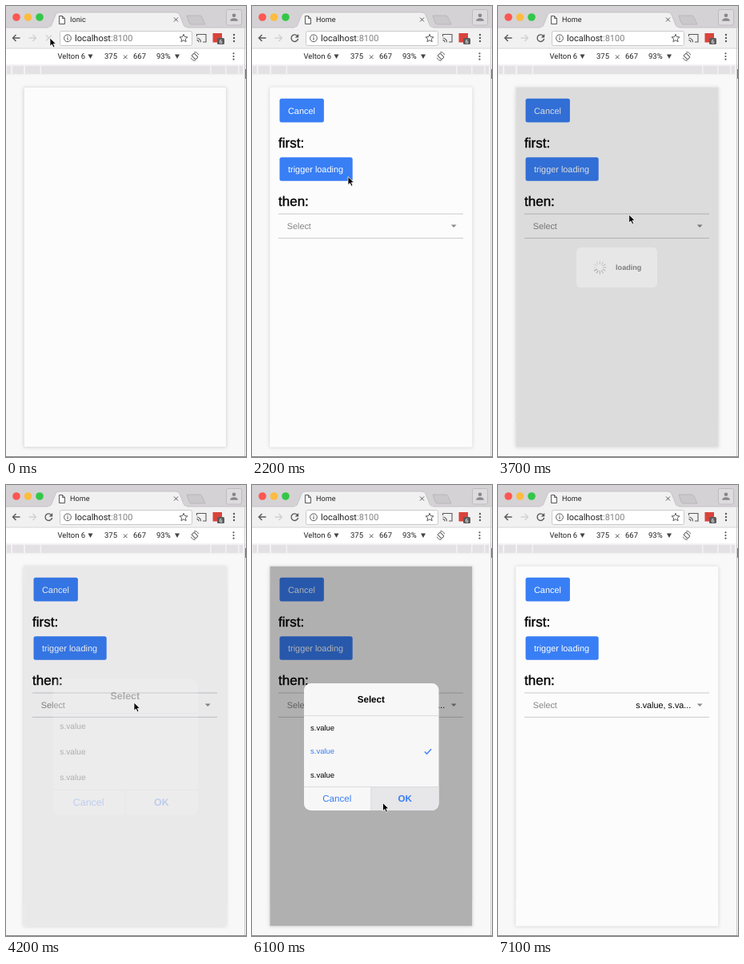
Recreate the animation shown at these times as an HTML page. Size 300 by 564 pixels, loop 7.8 s.

```html
<!DOCTYPE html>
<html lang="en">
<head>
<meta charset="utf-8">
<title>Loading and select demo</title>
<style>
html, body { margin: 0; width: 100%; height: 100%; overflow: hidden; background: #f8f8f8; }
svg { display: block; width: 300px; height: 564px; }
text { font-family: "Liberation Sans", Arial, sans-serif; text-rendering: geometricPrecision; }
.ui text { font-family: Roboto, "Open Sans", sans-serif; fill: #222; }
.ui .bar { font-size: 9.5px; }
.line { fill: none; stroke: #5a5a5a; stroke-width: 1.4; }
.head { font-size: 17px; stroke: #000; stroke-width: .35px; }
.body { font-size: 9.4px; }
.code { font-family: "Liberation Mono", monospace; font-size: 9.2px; }
.bold { font-size: 11.6px; font-weight: bold; text-anchor: middle; }
.tab { font-size: 6.9px; text-anchor: middle; fill: #8c8c8c; }
.btn { fill: #387ef5; }
.label { font-size: 10.9px; fill: #fff; }
.field { font-size: 10.8px; }
.item { font-size: 9.5px; }
.rule { stroke: #c8c7cc; stroke-width: 1; }
.thin { stroke: #dbdbdf; stroke-width: 1; }
.blue { fill: #387ef5; }
</style>
</head>
<body>
<svg viewBox="0 0 300 564">
  <defs>
    <clipPath id="screen"><rect x="22.4" y="101.7" width="252.8" height="449.8"/></clipPath>
    <filter id="soft" x="-10%" y="-10%" width="120%" height="120%"><feGaussianBlur stdDeviation="2.2"/></filter>
  </defs>

  <!-- browser window -->
  <g class="ui">
    <rect width="300" height="564" fill="#f8f8f8"/>
    <rect width="300" height="28" fill="#d4d2d4"/>
    <rect y="27" width="300" height="26" fill="#f2f1f2"/>
    <path d="M0 27H52C56 27 57 24 58 21L62 11Q63 8 67 8H212Q216 8 217 11L221 21C222 24 223 27 227 27H300" fill="#f2f1f2" stroke="#bebcbe" stroke-width=".8"/>
    <path d="M53 27.5H226" stroke="#f2f1f2" stroke-width="1.5"/>
    <path d="M226 12H242Q244 12 245 14L249 23H232Q230 23 229 21Z" fill="#cac8ca" stroke="#b4b2b4" stroke-width=".8"/>
    <circle cx="13" cy="14" r="4.8" fill="#fc5753"/>
    <circle cx="27.5" cy="14" r="4.8" fill="#fdbc40"/>
    <circle cx="42" cy="14" r="4.8" fill="#33c748"/>
    <path class="line" d="M66.5 12.5H70.5L73.5 15.5V22.5H66.5ZM70.5 12.5V15.5H73.5" style="fill:#fff;stroke-width:1"/>
    <text id="title" x="80" y="20" font-size="9.1">Ionic</text>
    <path class="line" d="M210 14.5L215 19.5M215 14.5L210 19.5" style="stroke-width:1"/>
    <rect x="275.5" y="4.5" width="19" height="19.5" rx="2" fill="#dddbdd" stroke="#b8b6b8" stroke-width=".8"/>
    <circle cx="285" cy="11.8" r="2.3" fill="#88868a"/>
    <path d="M280.3 18.8V17.4Q281.5 15.3 285 15.3T289.7 17.4V18.8Z" fill="#88868a"/>

    <path class="line" d="M17.5 40H8.5M12.5 36L8.5 40L12.5 44"/>
    <path class="line" d="M28.5 40H37.5M33.5 36L37.5 40L33.5 44" style="stroke:#d2d0d2"/>
    <path id="stop" class="line" d="M50 36.5L57 43.5M57 36.5L50 43.5" style="stroke:#d2d0d2"/>
    <g id="reload"><path class="line" d="M56.5 37.2A4.3 4.3 0 1 0 57.6 41"/><path d="M58.2 35V39.5H53.7Z" fill="#5a5a5a"/></g>
    <rect x="67.5" y="31.5" width="165" height="18" rx="2" fill="#fff" stroke="#c6c4c6" stroke-width=".9"/>
    <circle class="line" cx="77" cy="40.3" r="4.4" style="stroke-width:1"/>
    <path class="line" d="M77 39.6V42.8M77 37.7V38.8" style="stroke-width:1.1"/>
    <text x="86" y="44.2" font-size="11">localhost<tspan fill="#808080" style="fill:#808080">:8100</tspan></text>
    <path class="line" d="M222 35.3L223.4 38.6L227 38.9L224.3 41.2L225.1 44.7L222 42.8L218.9 44.7L219.7 41.2L217 38.9L220.6 38.6Z" style="stroke-width:1"/>
    <path class="line" d="M238.5 38V35.5H250V45H246M238.5 40A5 5 0 0 1 243.5 45.2M238.5 42.6A2.5 2.5 0 0 1 241 45.2" style="stroke-width:1.1"/>
    <rect x="258.5" y="34" width="11.5" height="11.5" fill="#d9433c"/>
    <rect x="264" y="40" width="9" height="8" rx="1.5" fill="#5c5c5e"/>
    <text x="268.5" y="46.7" font-size="7.2" text-anchor="middle" style="fill:#fff">6</text>
    <g fill="#5a5a5a"><circle cx="285" cy="36" r="1.2"/><circle cx="285" cy="40" r="1.2"/><circle cx="285" cy="44" r="1.2"/></g>

    <rect y="53" width="300" height="20" fill="#fff"/>
    <path d="M0 53H300" stroke="#cfcdcf" stroke-width=".8"/>
    <text class="bar" x="64.5" y="66.3">Velton 6</text>
    <path d="M102.5 60.5H108.5L105.5 66Z" fill="#444"/>
    <text class="bar" x="123" y="66.3">375</text>
    <path class="line" d="M147 61.5L151.5 66M151.5 61.5L147 66" style="stroke-width:1"/>
    <text class="bar" x="159" y="66.3">667</text>
    <text class="bar" x="188" y="66.3">93%</text>
    <path d="M211 60.5H217L214 66Z" fill="#444"/>
    <g transform="rotate(-45 236 63)"><rect class="line" x="233.8" y="59.5" width="4.4" height="7" rx=".8" style="stroke-width:1"/><path class="line" d="M231.5 61A5 5 0 0 0 233 67.3M240.5 65A5 5 0 0 0 239 58.7" style="stroke-width:.9"/></g>
    <g fill="#5a5a5a"><circle cx="284.5" cy="59.3" r="1.1"/><circle cx="284.5" cy="63" r="1.1"/><circle cx="284.5" cy="66.7" r="1.1"/></g>
    <rect y="73" width="298" height="13.5" fill="#f3f2f3"/>
    <path d="M1 80H6M8 80H22M24 80H42.5M44 80H255M256.5 80H274M275.5 80H290M291.5 80H296" stroke="#e3e1e4" stroke-width="10"/>
    <rect x="298" y="73" width="2" height="491" fill="#f4f4f4"/>
    <path d="M298.5 28V564" stroke="#c8c6c8" stroke-width=".9"/>
    <path d="M299.5 79V91" stroke="#777" stroke-width="1"/>
    <path d="M0 563.5H300" stroke="#8a888a"/>
    <g id="tip">
      <rect x="55" y="54.5" width="95" height="15" fill="#999" opacity=".5" filter="url(#soft)"/>
      <rect x="54.5" y="53.5" width="96" height="15" fill="#eeedee" stroke="#c6c4c6" stroke-width=".8"/>
      <text x="59" y="63.8" font-size="8.6" style="fill:#000">Stop loading this page</text>
    </g>
  </g>

  <!-- device -->
  <rect x="22" y="102" width="253.5" height="450" fill="#888" opacity=".35" filter="url(#soft)"/>
  <rect x="22.4" y="101.7" width="252.8" height="449.8" fill="#fdfcfd" stroke="#e2e1e2" stroke-width=".6"/>
  <g clip-path="url(#screen)">
    <g id="home">
      <rect x="22" y="101" width="254" height="30.5" fill="#f8f7f8"/>
      <path d="M22 131.5H276M22 518.5H276" stroke="#b2b2b2" stroke-width=".9"/>
      <text class="bold" x="149" y="121">Home</text>
      <text class="head" x="33" y="156.5">Welcome to Ionic!</text>
      <g class="body">
        <text x="33" y="177.5">This starter project comes with simple tabs-based</text>
        <text x="33" y="188.2">layout for apps that are going to primarily use a</text>
        <text x="33" y="199">Tabbed UI.</text>
        <text x="33" y="219.7">Take a look at the <tspan class="code">app/</tspan> directory to add or change</text>
        <text x="33" y="230.4">tabs, update any existing page or create new pages.</text>
      </g>
      <rect x="22" y="519" width="254" height="33" fill="#f8f7f8"/>
      <path class="blue" d="M56.5 532.2L64.5 524L67 526.5V525H70.3V529.8L72.7 532.2L71.6 533.3L64.5 526.3L57.6 533.3ZM58.4 533.5L64.5 527.5L70.6 533.5V539.8H66.4V535H62.6V539.8H58.4Z"/>
      <g fill="none" stroke="#8c8c8c" stroke-width=".9">
        <circle cx="148.5" cy="531.5" r="8"/>
        <path d="M147 529.8H148.7V535.3M146.8 535.5H150.5M148.4 526.7V528.3" stroke-width="1.1"/>
        <circle cx="233" cy="531.5" r="8"/>
        <ellipse cx="231.2" cy="529.8" rx="2.6" ry="3.4"/>
        <path d="M226.3 536Q227 534.8 229.7 534V532.7M232.7 532.7V534Q236 535 236.3 538.3M234 526.8Q237.7 526 237.6 530Q237.4 532 236.3 533Q236.4 534.2 239.6 535.5"/>
      </g>
      <text class="tab" x="64.5" y="548.7" style="fill:#387ef5">Home</text>
      <text class="tab" x="148.8" y="548.7">About</text>
      <text class="tab" x="233" y="548.7">Contact</text>
    </g>

    <g id="modal">
      <rect x="22" y="101" width="254" height="451" fill="#fdfcfd"/>
      <rect class="btn" x="34.5" y="115.8" width="55.4" height="29.6" rx="2.5"/>
      <text class="label" x="45" y="134.5">Cancel</text>
      <text class="head" x="33" y="176.7">first:</text>
      <rect id="trigger" class="btn" x="34.5" y="189.2" width="91.2" height="29.6" rx="2.5"/>
      <text class="label" x="45" y="208">trigger loading</text>
      <text class="head" x="33" y="249.7">then:</text>
      <path class="rule" d="M33 260H264M33 290.3H264"/>
      <text class="field" x="43.8" y="278.8" fill="#858585">Select</text>
      <text id="value" class="field" x="241.3" y="278.8" text-anchor="end">s.value, s.va...</text>
      <path d="M248.8 273.4H255.6L252.2 276.9Z" fill="#8a8a8a"/>
    </g>

    <rect id="shade" x="22" y="101" width="254" height="451"/>

    <g id="loading">
      <rect x="95" y="300.5" width="107" height="53" rx="5.5" fill="#f8f7f8"/>
      <g id="spinner" stroke="#555" stroke-width="1.1" stroke-linecap="round"></g>
      <text x="147" y="330.4" font-size="9.6" font-weight="bold">loading</text>
    </g>

    <g id="alert">
      <rect x="65" y="248" width="168.5" height="159" rx="8.5" fill="#f8f7f8"/>
      <text class="bold" x="148.8" y="272.3">Select</text>
      <rect id="row" x="65" y="318" width="168.5" height="30" fill="#e9e8e9"/>
      <g class="item">
        <text x="73" y="306.6">s.value</text>
        <text id="choice" x="73" y="336.4">s.value</text>
        <text x="73" y="366.2">s.value</text>
      </g>
      <path id="check" d="M215.8 333.4L218.6 336.2L224 330.2" fill="none" stroke="#387ef5" stroke-width="1.4"/>
      <path id="pressed" d="M148.8 377.5H233.5V398.5A8.5 8.5 0 0 1 225 407H148.8Z" fill="#e7e6e8"/>
      <path class="thin" d="M65 288.5H233.5M65 377.5H233.5M148.8 377.5V407"/>
      <text class="blue" x="106.3" y="396.3" font-size="11.6" text-anchor="middle">Cancel</text>
      <text class="bold blue" x="191.2" y="396.3">OK</text>
    </g>
  </g>
  <path id="scrollbar" d="M275.5 132V288" stroke="#c4c3c4" stroke-width=".9"/>

  <path id="cursor" d="M0 0V10.2L2.4 8L4.1 11.8L5.9 11L4.3 7.3H7.5Z" stroke="#fff" stroke-width=".8"/>
</svg>

<script>
const LOOP = 7800, STEP = 100;
const $ = id => document.getElementById(id);
const ramp = (t, from, to) => Math.min(1, Math.max(0, (t - from) / (to - from)));
const show = (id, on) => { $(id).style.display = on ? "" : "none"; };

// time, x, y of the pointer tip
const path = [
  [0, 55, 40], [800, 55, 40], [1200, 150, 267], [1600, 150, 267],
  [2100, 120, 213.5], [2900, 120, 213.5], [3600, 164, 260], [4200, 160, 272],
  [4600, 149.5, 334], [4800, 149.5, 334], [5100, 170, 391], [5300, 170, 391],
  [5700, 163.5, 397.5], [6200, 163.5, 397.5], [6800, 117, 206], [7000, 100, 150]
];

function pointer(t) {
  const i = path.findIndex(p => p[0] > t);
  if (i < 0) return path[path.length - 1].slice(1);
  const [t0, x0, y0] = path[i - 1], [t1, x1, y1] = path[i];
  const k = ramp(t, t0, t1), e = k * k * (3 - 2 * k);
  return [x0 + (x1 - x0) * e, y0 + (y1 - y0) * e];
}

const spokes = Array.from({ length: 12 }, (_, i) => {
  const s = document.createElementNS("http://www.w3.org/2000/svg", "path");
  s.setAttribute("d", "M0 -4.7V-8.4");
  s.setAttribute("transform", `translate(126 327) rotate(${i * 30})`);
  $("spinner").append(s);
  return s;
});

// overlay that shrinks in from 1.1 and on to 0.9 as it leaves
function overlay(id, t, enter, leave) {
  const a = ramp(t, enter, enter + 200), b = ramp(t, leave, leave + 210);
  const scale = 1.1 - .1 * a - .1 * b, alpha = a * (1 - b);
  $(id).setAttribute("transform", `translate(148.8 327) scale(${scale}) translate(-148.8 -327)`);
  $(id).style.opacity = alpha;
  show(id, alpha > 0);
  return alpha;
}

function draw(t) {
  const loaded = t >= 400;
  $("title").textContent = loaded ? "Home" : "Ionic";
  show("stop", !loaded);
  show("reload", loaded);
  show("home", loaded);
  show("scrollbar", loaded && t < 1400);
  show("tip", t >= 600 && t < 1400);

  const slide = 450 * (1 - ramp(t, 1400, 1900)) ** 3;
  show("modal", t >= 1400);
  $("modal").setAttribute("transform", `translate(0 ${slide})`);
  $("trigger").style.fill = t >= 2300 && t < 2500 ? "#3474e1" : "";
  show("value", t >= 6100);

  const dim = Math.max(overlay("loading", t, 2350, 3580), overlay("alert", t, 4150, 6150));
  $("shade").style.opacity = .3 * dim;
  const turn = Math.floor(t / 1000 * 12);
  spokes.forEach((s, i) => { s.style.opacity = 1 - ((turn - i) % 12 + 12) % 12 / 14; });

  const chosen = t >= 4800;
  show("row", t >= 4700 && t < 4900);
  $("choice").style.fill = chosen ? "#387ef5" : "";
  show("check", chosen);
  show("pressed", t >= 5900);

  $("cursor").setAttribute("transform", `translate(${pointer(t)})`);
  show("cursor", t < 7100);
}

const start = performance.now();
function tick() {
  const t = (performance.now() - start) % LOOP;
  draw(Math.floor(t / STEP) * STEP);
  requestAnimationFrame(tick);
}
tick();
</script>
</body>
</html>
```
